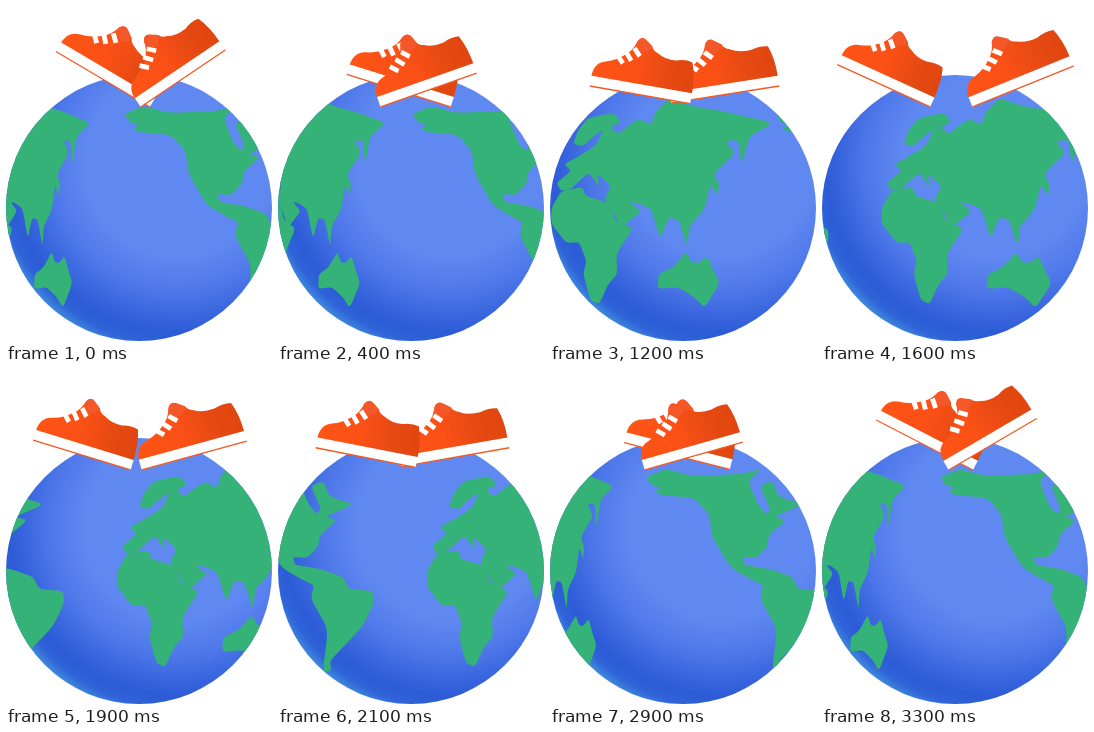
An HTML page with a canvas for the animation above (3.4 s loop, 266 by 335 pixels).

```html
<!DOCTYPE html>
<html lang="en">
<head>
<meta charset="utf-8">
<title>Shoes walking on a globe</title>
<style>
html, body { margin: 0; width: 100%; height: 100%; overflow: hidden; background: #fff; }
canvas { display: block; width: 266px; height: 335px; }
</style>
</head>
<body>
<canvas id="stage" width="266" height="335"></canvas>
<script>
const ctx = document.getElementById('stage').getContext('2d');
const LOOP = 3400, LAP = 436;

// Closed coast through a few key points, slightly rounded at each
function coast(text) {
  const n = text.split(/[ ,]+/).map(Number), pts = [], path = new Path2D();
  for (let i = 0; i < n.length; i += 2) pts.push([n[i], n[i + 1]]);
  const toward = (p, q) => [p[0] + (q[0] - p[0]) * .25, p[1] + (q[1] - p[1]) * .25];
  pts.forEach((p, i) => {
    path.lineTo(...toward(p, pts.at(i - 1)));
    path.quadraticCurveTo(...p, ...toward(p, pts[(i + 1) % pts.length]));
  });
  path.closePath();
  return path;
}

const eurasia = coast('178,92 164,106 160,119 148,113 138,119 127,128 119,121 130,116 122,107 97,112 87,124 82,138 92,140 106,127 112,124 105,139 88,150 73,158 80,165 65,177 70,185 80,183 90,173 98,167 108,181 106,168 120,180 113,193 122,206 130,222 150,205 138,196 146,197 160,203 169,233 177,212 187,213 196,241 198,220 213,204 219,178 226,190 228,178 222,168 244,147 234,135 247,134 250,159 258,130 283,117 230,105 200,100');
const africa = coast('70,185 91,181 94,190 118,197 124,215 142,222 125,248 126,268 117,278 108,298 99,294 92,268 95,255 88,236 75,237 60,218 60,202');
const australia = coast('167,283 168,268 182,262 197,246 202,256 209,257 219,250 224,262 232,277 216,302 205,291 188,281');
const america = coast('-20,108 0,100 26,107 75,105 95,100 82,112 92,136 100,145 104,140 94,117 106,112 113,128 137,135 108,148 120,151 103,166 101,178 90,189 76,188 78,196 104,200 126,208 132,220 156,222 157,234 146,257 128,276 113,292 114,302 106,302 111,260 94,230 97,216 86,211 65,199 46,168 43,145 28,129 -5,126 -12,122 -4,119 -15,116');

// mid: centre of the outline; home: its place at the start; squeeze: narrowing near the rim
const lands = [
  { shapes: [eurasia, africa], mid: 175, home: 25, squeeze: x => Math.min(1, .55 + Math.max(0, x - 25) / 150) },
  { shapes: [australia], mid: 199, home: 47, squeeze: x => Math.min(1, .59 + Math.max(0, x - 47) / 250) },
  { shapes: [america], mid: 60, home: 196, squeeze: x => Math.min(1, 1 - (x - 183) / 430) }
];

// The globe speeds up, then settles
function turn(t) {
  const fast = 2900, reach = 416;
  if (t < fast) return reach * (t / fast) ** 1.72;
  const u = Math.min(1, (t - fast) / 400);
  return reach + (LAP - reach) * u * (2 - u);
}

// Tilt of the front shoe: heel up, toe up, heel up
function tilt(t) {
  const peak = 1600, low = -34, high = 24.5;
  const u = t < peak ? t / peak : 1 - ((t - peak) / (LOOP - peak)) ** 1.15;
  return low + (high - low) * u;
}

function gradient(g, stops) {
  stops.forEach(stop => g.addColorStop(...stop));
  return g;
}
const sea = gradient(ctx.createRadialGradient(172, 158, 0, 172, 158, 195),
  [[0, '#6089f2'], [.48, '#6088f1'], [.65, '#4f78ea'], [.87, '#2c5bd6'], [.93, '#2f63d8'], [1, '#4493dd']]);
const leather = gradient(ctx.createLinearGradient(0, 0, 106, -12),
  [[0, '#ff5416'], [.45, '#fb5016'], [.75, '#e64a12'], [1, '#e0460f']]);

const upper = new Path2D('M0-10C0-19 4-25 12-27Q24-30 34-40Q39-45 41-53Q45-59 50-55L57-50Q58-46 64-44Q72-39 84-40Q93-43 101-41Q106-28 106-10Z');
const tongue = new Path2D('M39-44Q40-52 44-56Q48-57 57-49Q55-44 49-42Z');
const laces = new Path2D('M23-35l7 7M31-40l7 8M39-45l7 7');

function drawGlobe(t) {
  ctx.save();
  ctx.beginPath();
  ctx.arc(133, 202, 133, 0, Math.PI * 2);
  ctx.fillStyle = sea;
  ctx.fill();
  ctx.clip();
  ctx.fillStyle = '#34b277';
  for (const { shapes, mid, home, squeeze } of lands) {
    for (const lap of [0, LAP]) {
      const x = home + turn(t) - lap;
      ctx.save();
      ctx.translate(x, 0);
      ctx.scale(squeeze(x), 1);
      ctx.translate(-mid, 0);
      shapes.forEach(shape => ctx.fill(shape));
      ctx.restore();
    }
  }
  ctx.restore();
}

// The shoe rolls on its heel when the toe is up, on its toe otherwise
function drawShoe(toe, length, angle) {
  const pivot = angle > 0 ? length : 0;
  ctx.save();
  ctx.translate(toe + pivot - 2.2 * angle, 91 + 10 * Math.min(1, Math.abs(angle) / 15));
  ctx.rotate(angle * Math.PI / 180);
  ctx.translate(-pivot, 0);
  ctx.scale(length / 106, 1);
  ctx.fillStyle = leather;
  ctx.fill(upper);
  ctx.fillStyle = '#f4582a';
  ctx.fill(tongue);
  ctx.fillStyle = '#fff';
  ctx.fillRect(0, -10.5, 106, 10.5);
  ctx.fillStyle = '#f4581f';
  ctx.fillRect(0, -.7, 106, 1.3);
  ctx.strokeStyle = '#fff';
  ctx.lineWidth = 4.8;
  ctx.stroke(laces);
  ctx.restore();
}

function frame() {
  const t = performance.now() % LOOP, angle = tilt(t);
  ctx.fillStyle = '#fff';
  ctx.fillRect(0, 0, 266, 335);
  drawGlobe(t);
  drawShoe(102, 109, -.9 * angle);
  drawShoe(60, 102, angle);
  requestAnimationFrame(frame);
}
frame();
</script>
</body>
</html>
```
